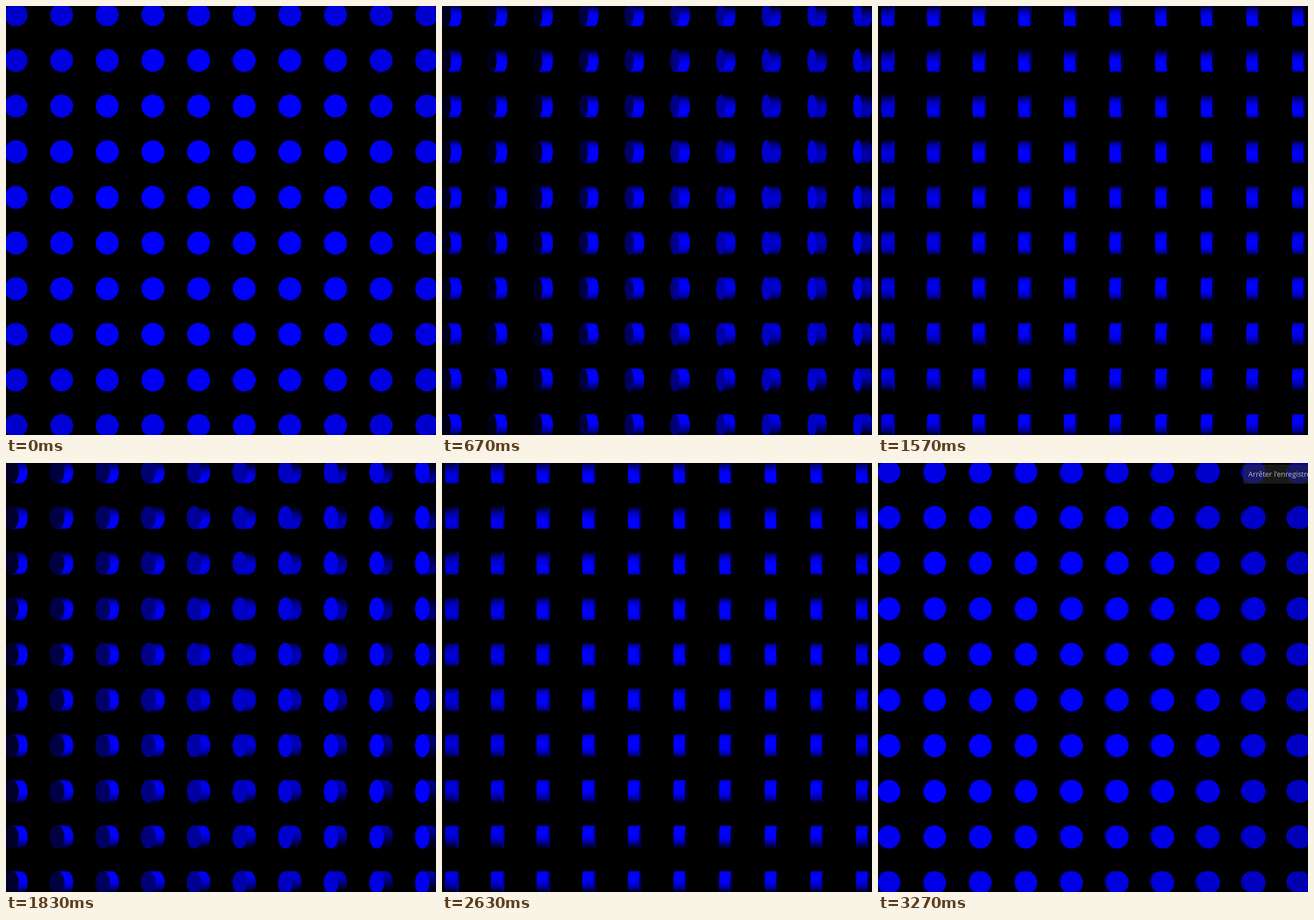
An HTML page with a canvas for the animation above (3.31 s loop, 749 by 747 pixels).

```html
<!DOCTYPE html>
<html lang="fr">
<head>
<meta charset="utf-8">
<style>
  html, body { margin: 0; width: 100%; height: 100%; overflow: hidden; background: #000; }
  canvas { display: block; }
</style>
</head>
<body>
<canvas id="stage" width="749" height="747"></canvas>
<script>
const ctx = document.getElementById('stage').getContext('2d');
const LOOP = 3310, STEP = 100 / 3, HALF_TURN_STEPS = 32;
const GRID = 10, GAP = 79.5, FIRST_X = 17.4, FIRST_Y = 15.3;
const RADIUS = 20, HALF_DEPTH = 10;
const LIGHT = { x: 374.5, y: 373.5, z: 500 }, AMBIENT = 0.1;

// Lambert shading from one point light in front of the grid centre
function shade(x, y, nx, ny, nz) {
  const lx = LIGHT.x - x, ly = LIGHT.y - y;
  const dot = (nx * lx + ny * ly + nz * LIGHT.z) / Math.hypot(lx, ly, LIGHT.z);
  const level = Math.min(1, AMBIENT + Math.max(0, dot));
  return `rgb(0,0,${Math.round(255 * level)})`;
}

function sideGradient(x, y, ux, uz) {
  const gradient = ctx.createLinearGradient(0, y - RADIUS, 0, y + RADIUS);
  const stops = 16;
  for (let i = 0; i <= stops; i++) {
    const ny = -Math.cos(Math.PI * i / stops);
    const c = Math.sqrt(Math.max(0, 1 - ny * ny));
    gradient.addColorStop((ny + 1) / 2, shade(x, y, ux * c, ny, uz * c));
  }
  return gradient;
}

function drawCylinder(x, y, angle) {
  const s = Math.sin(angle), c = Math.cos(angle);
  const rx = RADIUS * Math.abs(c), shift = HALF_DEPTH * s;
  const facing = c >= 0 ? 1 : -1;

  if (s > 0.001) {
    ctx.fillStyle = sideGradient(x, y, -c, s);
    ctx.beginPath();
    ctx.ellipse(x - shift, y, rx, RADIUS, 0, Math.PI / 2, Math.PI * 1.5);
    ctx.ellipse(x + shift, y, rx, RADIUS, 0, -Math.PI / 2, Math.PI / 2);
    ctx.fill();
  }
  if (rx > 0.01) {
    ctx.fillStyle = shade(x, y, facing * s, 0, facing * c);
    ctx.beginPath();
    ctx.ellipse(x + facing * shift, y, rx, RADIUS, 0, 0, Math.PI * 2);
    ctx.fill();
  }
}

function drawCursor(x, y) {
  const outline = [[0, 0], [0, 16], [3.6, 12.6], [6, 18], [8.4, 17], [6, 11.6], [11, 11.6]];
  ctx.beginPath();
  outline.forEach(([dx, dy]) => ctx.lineTo(x + dx, y + dy));
  ctx.closePath();
  ctx.fillStyle = '#fff';
  ctx.fill();
  ctx.strokeStyle = '#000';
  ctx.lineWidth = 0.8;
  ctx.stroke();
}

function drawTooltip(opacity) {
  ctx.save();
  ctx.globalAlpha = opacity;
  ctx.fillStyle = '#2b2b2b';
  ctx.beginPath();
  ctx.roundRect(636, 3, 180, 33, 3);
  ctx.fill();
  ctx.globalAlpha = opacity * 1.15;
  ctx.fillStyle = '#fff';
  ctx.font = '12.5px "Open Sans", "Noto Sans", sans-serif';
  ctx.fillText("Arrêter l'enregistrement", 645, 24);
  ctx.restore();
}

function draw(now) {
  const step = Math.floor((now % LOOP + 4) / STEP);
  const angle = Math.PI * (step % HALF_TURN_STEPS) / HALF_TURN_STEPS;
  ctx.fillStyle = '#000';
  ctx.fillRect(0, 0, 749, 747);
  for (let row = 0; row < GRID; row++) {
    for (let col = 0; col < GRID; col++) {
      drawCylinder(FIRST_X + col * GAP, FIRST_Y + row * GAP, angle);
    }
  }
  if (step >= 63 && step <= 65) drawCursor(723.5, -7);
  if (step >= 97) drawTooltip(step === 97 ? 0.3 : 0.6);
}

const start = performance.now();
function tick() {
  draw(performance.now() - start);
  requestAnimationFrame(tick);
}
tick();
</script>
</body>
</html>
```
